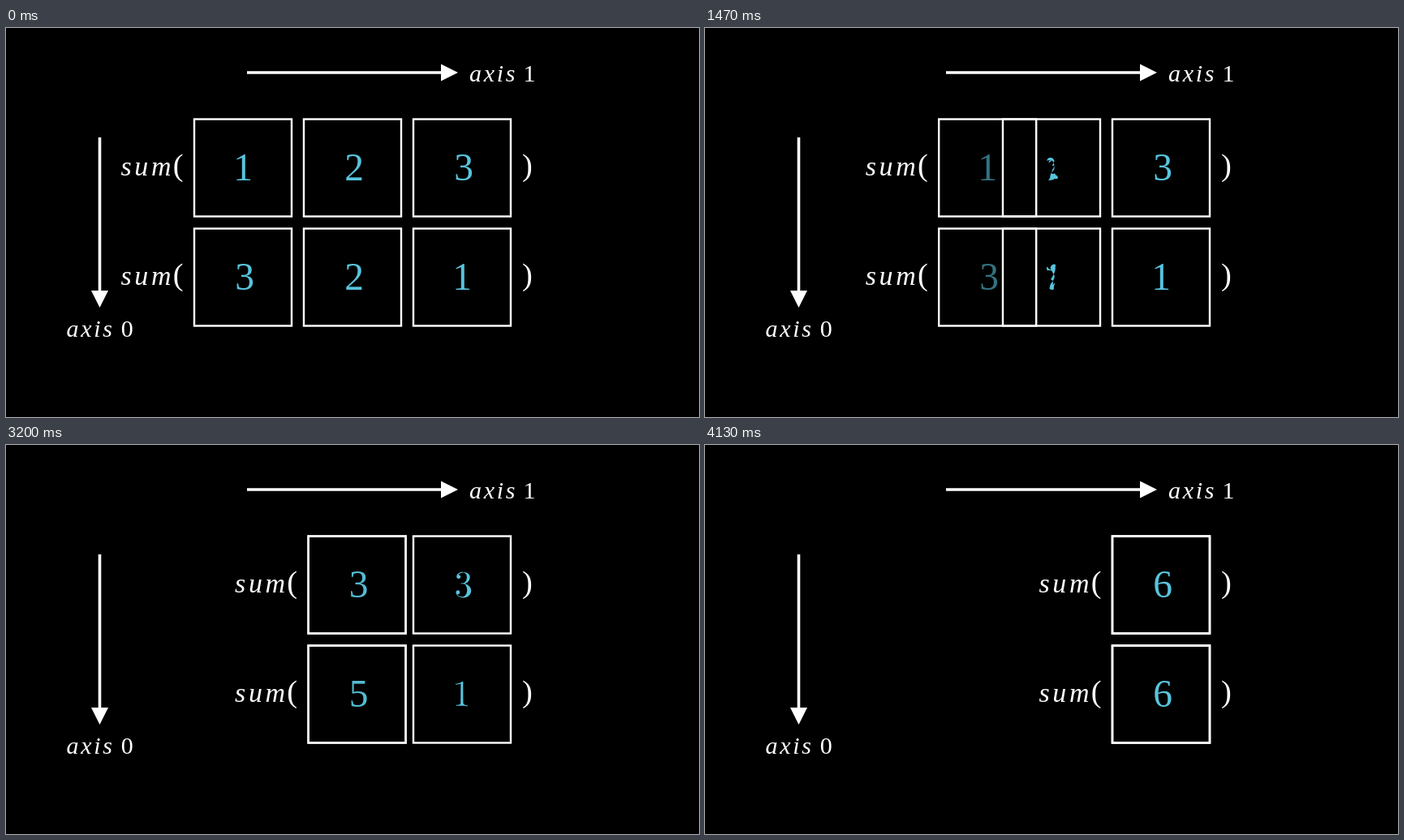
Recreate the animation shown at these times as an HTML page. Size 854x480 px, loop 4.99 s.

```html
<!DOCTYPE html>
<html lang="en">
<head>
<meta charset="utf-8">
<title>Sum along axis 1</title>
<style>
  html, body { margin: 0; width: 100%; height: 100%; overflow: hidden; background: #000; }
  svg { display: block; width: 854px; height: 480px; }
  text { font-family: "Liberation Serif", "Times New Roman", serif; fill: #fff; }
  .axis { font-size: 30px; }
  .axis .word { font-style: italic; letter-spacing: 2.7px; }
  .sum { font-size: 34px; font-style: italic; letter-spacing: 3.6px; }
  .paren { font-size: 38.5px; }
  .digit { font-size: 47.5px; text-anchor: middle; fill: #58c4dd; }
  .morph { fill: #58c4dd; }
  .box { fill: none; stroke: #fff; stroke-width: 2.4; }
  .shaft { stroke: #fff; stroke-width: 3.6; }
  .tip { fill: #fff; }
</style>
</head>
<body>
<svg id="stage" viewBox="0 0 854 480">
  <line class="shaft" x1="297" y1="55" x2="538" y2="55"/>
  <path class="tip" d="M557 55l-21-10.5v21z"/>
  <g class="axis"><text class="word" x="571" y="66">axis</text><text x="637.5" y="66">1</text></g>

  <line class="shaft" x1="115.5" y1="135" x2="115.5" y2="326"/>
  <path class="tip" d="M115.5 345l-10.5-21h21z"/>
  <g class="axis"><text class="word" x="74.5" y="380.5">axis</text><text x="141.8" y="380.5">0</text></g>
</svg>
<script>
const LOOP = 4990, PITCH = 135, FPS = 15;
const EM = 0.048;        // pixels per outline unit
const ROWS = [[1, 2, 3], [3, 2, 1]];

// Outlines for the changing digits: 1000 units per em, y upwards
const OUTLINES = {
  1: 'M294 640Q294 666 271 666Q209 602 89 602L89 571Q168 571 220 597L220 79Q220 31 127 31L95 31L95 0' +
     'Q130 3 257 3Q384 3 419 0L419 31L387 31Q294 31 294 79L294 640',
  2: 'M127 77L233 180Q449 371 449 472Q449 666 237 666Q50 666 50 485Q50 429 103 429Q155 429 155 482' +
     'Q155 534 102 534Q94 534 89 533Q125 635 224 635Q358 635 358 472Q358 370 253 251L61 37Q50 26 50 0' +
     'L421 0L449 174L424 174Q412 98 402 85Q395 77 307 77L127 77',
  3: 'M290 352Q430 398 430 528Q430 666 246 666Q69 666 69 530Q69 478 120 478Q171 478 171 529' +
     'Q171 579 109 579Q148 641 242 641Q338 641 338 529Q338 460 310 415Q280 365 221 363Q200 361 182 360' +
     'Q167 358 167 348Q167 337 191 337L235 337Q354 337 354 171Q354 6 241 6Q133 6 88 82Q154 73 154 137' +
     'Q154 193 98 193Q42 193 42 135Q42 -22 244 -22Q457 -22 457 171Q457 318 290 352',
  5: 'M449 201Q449 420 259 420Q180 420 132 369L132 564Q172 551 217 551Q385 570 410 655Q410 666 400 666' +
     'Q397 666 392 663Q323 634 256 634Q190 634 123 662Q115 665 111 665Q101 665 101 641L101 345' +
     'Q101 319 115 319Q122 319 128 328Q176 398 257 398Q315 398 342 334Q360 295 360 208Q360 110 336 71' +
     'Q296 6 229 6Q115 6 82 118Q88 116 99 116Q149 116 149 165Q149 214 99 214Q50 214 50 161' +
     'Q50 -22 231 -22Q449 -22 449 201',
  6: 'M132 328L132 352Q132 641 307 641Q370 641 395 601Q340 601 340 556Q340 510 386 510Q432 510 432 558' +
     'Q432 666 305 666Q42 666 42 316Q42 -22 251 -22Q457 -22 457 204Q457 427 257 427Q172 427 132 328' +
     'M251 6Q182 6 152 81Q134 128 134 226Q134 404 256 404Q318 404 349 342Q367 305 367 205' +
     'Q367 107 350 71Q320 6 251 6'
};

const lerp = (a, b, t) => a + (b - a) * t;
const mix = (p, q, t) => [lerp(p[0], q[0], t), lerp(p[1], q[1], t)];

// Outline text -> list of subpaths, each a list of cubic curves, left edge at 0
function parse(outline) {
  const subs = [];
  let pen;
  for (const [, cmd, args] of outline.matchAll(/([MLQ])([^MLQ]+)/g)) {
    const n = args.split(' ').map(Number), end = n.slice(-2);
    if (cmd === 'M') subs.push([]);
    else {
      const bend = n.slice(0, 2), k = cmd === 'Q' ? 0.56 : 1 / 3;
      subs[subs.length - 1].push([pen, mix(pen, bend, k), mix(end, bend, k), end]);
    }
    pen = end;
  }
  const left = Math.min(...subs.flat(2).map(p => p[0]));
  return subs.map(sub => sub.map(curve => curve.map(([x, y]) => [x - left, y])));
}

// Part of a cubic between parameters a and b
function slice(curve, a, b) {
  const blossom = (...ts) => ts.reduce(
    (pts, t) => pts.slice(1).map((p, i) => mix(pts[i], p, t)), curve)[0];
  return [blossom(a, a, a), blossom(a, a, b), blossom(a, b, b), blossom(b, b, b)];
}

// Split curves evenly until there are n
function refine(curves, n) {
  const parts = curves.map(() => 0);
  for (let i = 0; i < n; i++) parts[Math.floor(i * curves.length / n)]++;
  return curves.flatMap((c, i) =>
    Array.from({ length: parts[i] }, (_, j) => slice(c, j / parts[i], (j + 1) / parts[i])));
}

function makeMorph(from, to) {
  const a = parse(OUTLINES[from]), b = parse(OUTLINES[to]);
  const sub = (shape, i) => {
    if (shape[i]) return shape[i];
    const last = shape[shape.length - 1].slice(-1)[0][3];
    return [[last, last, last, last]];
  };
  const pairs = Array.from({ length: Math.max(a.length, b.length) }, (_, i) => {
    const p = sub(a, i), q = sub(b, i), n = Math.max(p.length, q.length);
    return [refine(p, n), refine(q, n)];
  });
  const fmt = p => p.map(v => v.toFixed(1)).join(' ');
  return t => pairs.map(([p, q]) => p.map((curve, i) => {
    const [s, c, d, e] = curve.map((pt, j) => fmt(mix(pt, q[i][j], t)));
    return (i ? '' : 'M' + s) + `C${c} ${d} ${e}`;
  }).join('') + 'Z').join('');
}

const stage = document.getElementById('stage');
function add(parent, tag, attrs, text = '') {
  const el = document.createElementNS('http://www.w3.org/2000/svg', tag);
  for (const key in attrs) el.setAttribute(key, attrs[key]);
  el.textContent = text;
  return parent.appendChild(el);
}

const cols = [0, 1, 2].map(() => add(stage, 'g', {}));
const fading = [[], [], []];
const cells = [];

// The narrow 1 sits left of the other digits' centre
function setDigit(cell, value) {
  cell.label.textContent = value;
  cell.label.setAttribute('x', 294 + cell.col * PITCH - (value === 1 ? 2 : 0));
}

ROWS.forEach((row, r) => {
  const dy = r * PITCH;
  add(cols[0], 'text', { class: 'sum', x: 141.5, y: 181.8 + dy }, 'sum');
  add(cols[0], 'text', { class: 'paren', x: 205.8, y: 181.7 + dy }, '(');
  add(stage, 'text', { class: 'paren', x: 636, y: 181.7 + dy }, ')');
  let total = 0;
  row.forEach((value, col) => {
    const dx = col * PITCH;
    add(cols[col], 'rect', { class: 'box', x: 232 + dx, y: 112.5 + dy, width: 120, height: 120 });
    const cell = { col, from: value, to: total += value };
    cell.label = add(cols[col], 'text', { class: 'digit', y: 188.3 + dy });
    setDigit(cell, value);
    fading[col].push(cell.label);
    if (!col) return;
    cell.shape = makeMorph(value, total);
    cell.path = add(cols[col], 'path', {
      class: 'morph', transform: `translate(${283.7 + dx} ${188.2 + dy}) scale(${EM} ${-EM})`
    });
    cells.push(cell);
  });
});

// Normalised logistic ease
function smooth(t) {
  const s = x => 1 / (1 + Math.exp(-x)), edge = s(-5);
  return (s(10 * (Math.min(1, Math.max(0, t)) - 0.5)) - edge) / (1 - 2 * edge);
}

function draw(now) {
  const tick = Math.floor((now % LOOP + 3.4) * FPS / 1000) / FPS;
  const p = [smooth(tick - 1), smooth(tick - 3)];

  cols[0].setAttribute('transform', `translate(${PITCH * (p[0] + p[1])})`);
  cols[1].setAttribute('transform', `translate(${PITCH * p[1]})`);
  p.forEach((v, col) => fading[col].forEach(el => el.setAttribute('opacity', 1 - v)));

  for (const cell of cells) {
    const t = p[cell.col - 1], moving = t > 0.005 && t < 0.995;
    setDigit(cell, t < 0.5 ? cell.from : cell.to);
    cell.label.setAttribute('visibility', moving ? 'hidden' : 'visible');
    cell.path.setAttribute('d', moving ? cell.shape(t) : '');
  }
  requestAnimationFrame(() => draw(performance.now()));
}
draw(performance.now());
</script>
</body>
</html>
```
